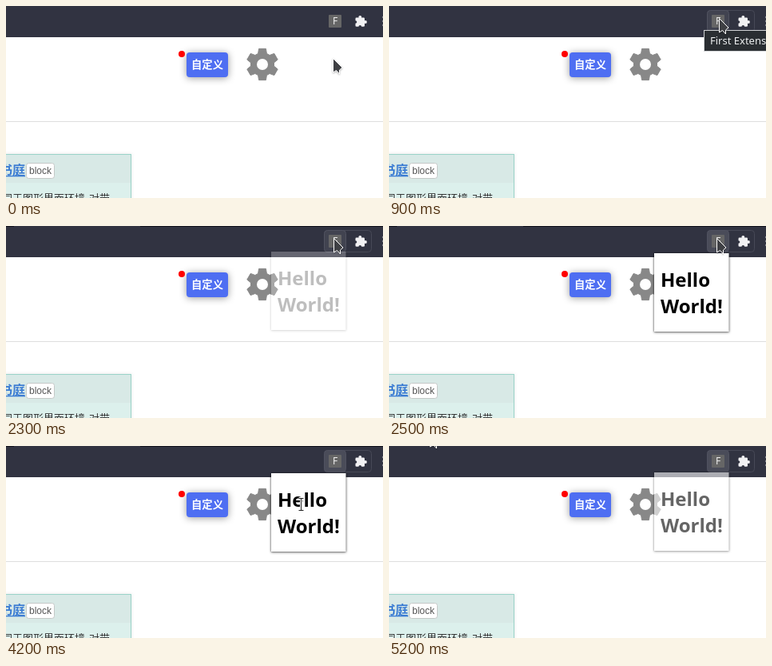
Recreate the animation shown at these times as an HTML page. Size 472x240 px, loop 5.3 s.

```html
<!DOCTYPE html>
<html lang="zh">
<head>
<meta charset="utf-8">
<title>Extension popup</title>
<style>
  html, body { margin: 0; width: 100%; height: 100%; overflow: hidden; background: #fff; }
  svg { display: block; width: 472px; height: 240px; }
  .ui { font-family: "Noto Sans", "Open Sans", sans-serif; }
  .cjk { font-family: "Noto Sans CJK SC", "Noto Sans CJK", sans-serif; }
  .button { filter: drop-shadow(0 1px 5px rgba(0, 0, 0, .4)); }
  .card { filter: drop-shadow(0 0 2px rgba(0, 0, 0, .1)); }
  .panel { filter: drop-shadow(0 0 1px rgba(0, 0, 0, .5)) drop-shadow(0 1px 1.5px rgba(0, 0, 0, .45)); }
  .pointer { filter: drop-shadow(0 1px 1px rgba(0, 0, 0, .3)); }
</style>
</head>
<body>
<svg viewBox="0 0 472 240">
  <!-- browser toolbar -->
  <rect width="472" height="39" fill="#313341"/>
  <path id="tabEdge" d="M0 .5H10M168 .5H472" stroke="#11121c"/>
  <g id="pill">
    <rect x="398.5" y="5.5" width="59" height="27" rx="4" fill="none" stroke="#474956"/>
    <rect id="hover" x="398.5" y="5.5" width="27" height="27" rx="4" stroke="#505260"/>
  </g>
  <rect x="404" y="11" width="16" height="16" rx="1" fill="#666"/>
  <text class="ui" x="412" y="23.3" font-size="12" fill="#eee" text-anchor="middle">F</text>
  <g fill="#f1f1f3">
    <rect x="437.5" y="14.5" width="11.5" height="11.3" rx="1.3"/>
    <circle cx="443.3" cy="13.8" r="1.9"/>
    <circle cx="450" cy="20" r="1.9"/>
  </g>
  <g fill="#313341"><circle cx="437.5" cy="20" r="1.8"/><circle cx="443.3" cy="25.8" r="1.8"/></g>
  <g fill="#a5a6ad"><circle cx="472.4" cy="14" r="1.3"/><circle cx="472.4" cy="19" r="1.3"/><circle cx="472.4" cy="24" r="1.3"/></g>

  <!-- page -->
  <rect y="144" width="472" height="1" fill="#dedede"/>
  <rect class="button" x="226" y="58" width="52" height="31" rx="4" fill="#4e6ef2"/>
  <text class="cjk" x="252" y="78" font-size="13.3" font-weight="700" fill="#fff" text-anchor="middle">自定义</text>
  <circle cx="220" cy="60" r="4" fill="#f00"/>
  <path id="gear" transform="translate(321 73)" fill="#888" stroke="#888" stroke-linejoin="round"/>
  <circle cx="321" cy="73" r="7" fill="#fff"/>

  <rect class="card" x="-2" y="185.5" width="158.5" height="60" fill="#dcf0ec" stroke="#9ad3c8"/>
  <rect y="186" width="156" height="35" fill="#d8e9e6"/>
  <text class="cjk" x="-8" y="210.5" font-size="16" font-weight="700" fill="#3b7cd3">书庭</text>
  <rect y="212" width="24" height="1.3" fill="#3b7cd3"/>
  <rect x="25.5" y="196.5" width="35" height="19" rx="3" fill="#fff" stroke="#c4c8c7"/>
  <text x="29" y="210" font-size="12" fill="#555" font-family="Liberation Sans, sans-serif">block</text>
  <g class="cjk" font-size="13" fill="#333">
    <text x="-5" y="245">同于图形界面环境</text><text x="99" y="245">,</text><text x="104" y="245">对带</text>
  </g>

  <g id="tooltip" class="ui">
    <rect x="394.5" y="30.5" width="100" height="26" fill="#2a2e32" stroke="#d0d2d4"/>
    <text x="402" y="48" font-size="13" fill="#eceeef">First Extension</text>
  </g>

  <g id="popup" class="ui" font-size="24" font-weight="700">
    <rect class="panel" x="332" y="34" width="93.5" height="98" fill="#fff"/>
    <text x="340" y="76">Hello</text>
    <text x="340" y="109">World!</text>
  </g>

  <path id="arrow" class="pointer" d="M.5 .5V18L4.5 15.5L8.5 20V15L12 12Z" fill="#3f4044" stroke="#fff" stroke-linejoin="round"/>
  <g id="beam">
    <path id="beamLine" d="M-2.5 -7.5H3.5M.5 -7.5V7.5M-2.5 7.5H3.5" stroke="#fff" stroke-width="3"/>
    <path d="M-2.5 -7.5H3.5M.5 -7.5V7.5M-2.5 7.5H3.5" stroke="#222"/>
  </g>
</svg>
<script>
const LOOP = 5300, TICK = 100;
const part = id => document.getElementById(id);
const show = (id, on) => part(id).setAttribute("visibility", on ? "visible" : "hidden");
const easeOut = p => 1 - (1 - p) ** 2;
const progress = (t, start, end) => Math.min(1, Math.max(0, (t - start) / (end - start)));

// Sweeps of the pointer; "via" bends a sweep into a curve
const home = [409, 65];
const sweeps = [
  { start: 0, end: 400, to: [413.3, 14.5] },
  { start: 1200, end: 1600, to: [409.5, 15] },
  { start: 2600, end: 3200, to: [366, 98], via: [361, 80] },
  { start: 3200, end: 3700, to: [354, 61], via: [390, 75] },
  { start: 3800, end: 4200, to: [369, 73] },
  { start: 4300, end: 4900, to: [50.5, -17], via: [390, 300] }
];

function pointerAt(t) {
  let place = home;
  for (const { start, end, to, via } of sweeps) {
    const u = easeOut(progress(t, start, end));
    place = place.map((from, i) => {
      const bend = via ? via[i] : (from + to[i]) / 2;
      return from * (1 - u) ** 2 + 2 * bend * u * (1 - u) + to[i] * u * u;
    });
  }
  return place;
}

function popupOpacity(t) {
  return t >= 5200 ? 0.6 : progress(t, 2100, 2500) ** 2;
}

function gearPath() {
  const tooth = [[-5.4, -13.6], [-4.4, -19.6], [4.4, -19.6], [5.4, -13.6]];
  const points = [];
  for (let i = 0; i < 6; i++) {
    const c = Math.cos(i * Math.PI / 3), s = Math.sin(i * Math.PI / 3);
    for (const [x, y] of tooth) points.push([x * c - y * s, x * s + y * c]);
  }
  return "M" + points.join("L") + "Z";
}

function draw(t) {
  const [x, y] = pointerAt(t).map(Math.round);
  const opacity = popupOpacity(t);
  const overPopup = opacity === 1 && x > 332 && x < 426 && y > 34 && y < 132;

  show("pill", t >= 300);
  part("hover").setAttribute("fill", t >= 2500 ? "#4a4c59" : "#414350");
  show("tabEdge", t >= 2100 && t < 5200);
  show("tooltip", t >= 900 && t < 2100);
  part("popup").setAttribute("opacity", opacity);
  part("popup").setAttribute("transform", `translate(0 ${-Math.round(3 * (1 - opacity))})`);
  show("arrow", !overPopup);
  show("beam", overPopup);
  part(overPopup ? "beam" : "arrow").setAttribute("transform", `translate(${x} ${y})`);
}

function frame() {
  draw(Math.floor(performance.now() % LOOP / TICK) * TICK);
  requestAnimationFrame(frame);
}

part("gear").setAttribute("d", gearPath());
frame();
</script>
</body>
</html>
```
